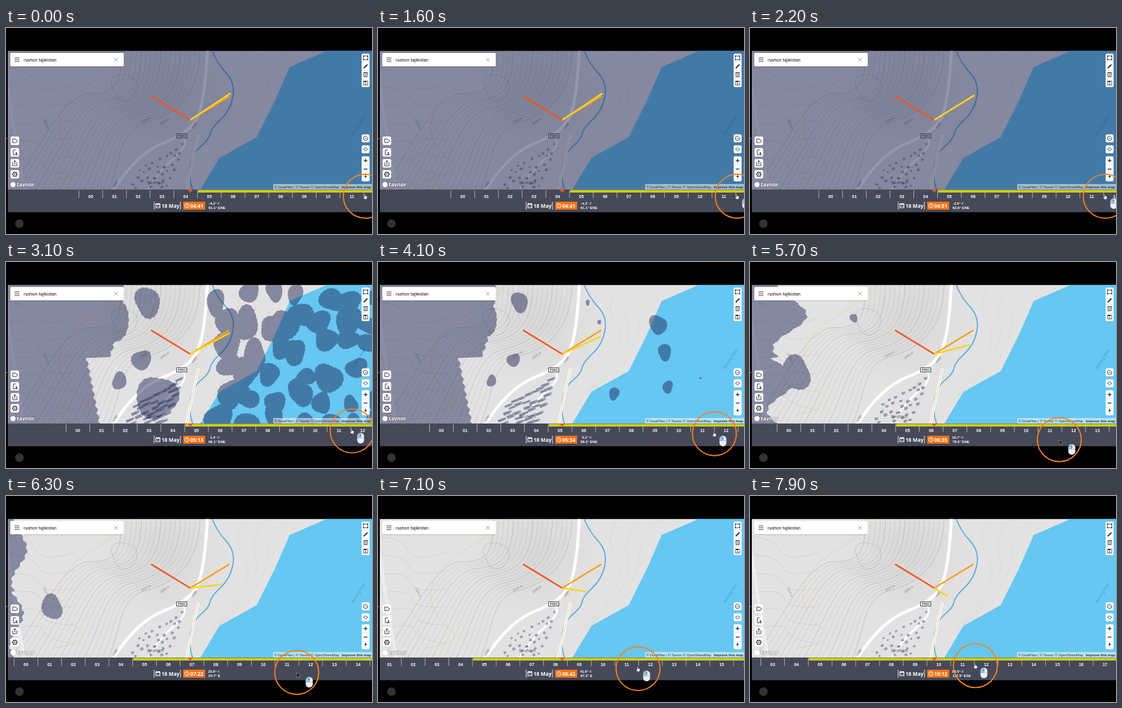
Write an HTML page with a canvas that moves like this. It is 600x338 px and loops after 8 s.

```html
<!DOCTYPE html>
<html lang="en">
<head>
<meta charset="utf-8">
<title>Sun and shade map</title>
<style>
html, body { margin: 0; width: 100%; height: 100%; overflow: hidden; background: #000; }
canvas { display: block; width: 600px; height: 338px; }
</style>
</head>
<body>
<canvas id="stage" width="600" height="338"></canvas>
<script>
const ctx = document.getElementById('stage').getContext('2d');
const LOOP = 8000, STEP = 100, HOUR = 38.9;
const TOP = 37.5, BASE = 266;
const SUNRISE = 2600;
const SANS = '"Open Sans", "Noto Sans", sans-serif';
const ARIAL = '"Liberation Sans", Arial, sans-serif';
const INK = '#333', WHITE = '#fff';
const { sin, cos, exp, sqrt, max, min, floor, round, PI } = Math;
const RAD = PI / 180;
const DIRS = ['N', 'NNE', 'NE', 'ENE', 'E', 'ESE', 'SE', 'SSE', 'S'];

// Clock in minutes over the drag: [ms, minutes]
const CLOCK = [[1500, 281], [2200, 291], [3100, 313], [4100, 334], [5200, 366], [6300, 442], [7900, 612]];

// Lasting shade patches: x, y, radius, time of vanishing
const LASTING = [
  [459, 103, 21, 4900], [470, 148, 17, 4900], [475, 205, 13, 4900], [387, 216, 13, 4900], [232, 66, 21, 4900],
  [222, 161, 15, 4900], [186, 195, 12, 4900], [170, 92, 32, 5800], [75, 182, 42, 6950], [247, 222, 32, 4000]];

// Monotone cubic through the clock keys
function clockAt(t) {
  const k = CLOCK, last = k.length - 1;
  if (t <= k[0][0]) return k[0][1];
  if (t >= k[last][0]) return k[last][1];
  const i = k.findIndex(key => key[0] > t) - 1;
  const slope = n => (k[n + 1][1] - k[n][1]) / (k[n + 1][0] - k[n][0]);
  const tangent = n => {
    if (n === 0) return 0;
    if (n === last) return slope(n - 1);
    const p = slope(n - 1), q = slope(n);
    return 2 * p * q / (p + q);
  };
  const [t0, a] = k[i], [t1, b] = k[i + 1], h = t1 - t0, u = (t - t0) / h, v = 1 - u;
  return v * v * ((1 + 2 * u) * a + u * h * tangent(i)) + u * u * ((3 - 2 * u) * b - v * h * tangent(i + 1));
}

function sunAt(minutes) {
  const lat = 37.98 * RAD, dec = 19.55 * RAD, h = (minutes - 729.7) * .25 * RAD;
  const alt = Math.asin(sin(lat) * sin(dec) + cos(lat) * cos(dec) * cos(h));
  const east = -cos(dec) * sin(h);
  const north = cos(lat) * sin(dec) - sin(lat) * cos(dec) * cos(h);
  return { alt: alt / RAD, az: Math.atan2(east, north) / RAD };
}

function seeded(seed) {
  return () => (seed = (seed * 16807) % 2147483647) / 2147483647;
}

const PATCHES = (() => {
  const rnd = seeded(4242), list = LASTING.map(([x, y, r, end]) => ({ x, y, rx: r, ry: r * 1.15, end }));
  for (let gx = 355; gx < 610; gx += 42) for (let gy = 55; gy < 266; gy += 42)
    list.push({ x: gx + 24 * (rnd() - .5), y: gy + 24 * (rnd() - .5), rx: 12 + 12 * rnd(), ry: 13 + 14 * rnd(), end: 3500 + 650 * rnd() });
  return list;
})();

function rect(x, y, w, h, fill, r = 0) {
  ctx.fillStyle = fill;
  ctx.beginPath();
  ctx.roundRect(x, y, w, h, r);
  ctx.fill();
}

function disc(x, y, r, fill) {
  ctx.fillStyle = fill;
  ctx.beginPath();
  ctx.arc(x, y, r, 0, 2 * PI);
  ctx.fill();
}

function ring(x, y, r, color, width = 1) {
  ctx.strokeStyle = color;
  ctx.lineWidth = width;
  ctx.beginPath();
  ctx.arc(x, y, r, 0, 2 * PI);
  ctx.stroke();
}

function text(str, x, y, font, fill, align = 'left') {
  ctx.font = font;
  ctx.fillStyle = fill;
  ctx.textAlign = align;
  ctx.fillText(str, x, y);
}

function slanted(str, x, y, deg, font, fill) {
  ctx.save();
  ctx.translate(x, y);
  ctx.rotate(deg * RAD);
  text(str, 0, 2, font, fill, 'center');
  ctx.restore();
}

function trace(pts) {
  ctx.beginPath();
  for (let i = 0; i < pts.length; i += 2) ctx.lineTo(pts[i], pts[i + 1]);
}

function line(pts, color, width) {
  trace(pts);
  ctx.strokeStyle = color;
  ctx.lineWidth = width;
  ctx.stroke();
}

function polygon(pts, fill) {
  trace(pts);
  ctx.fillStyle = fill;
  ctx.fill();
}

function curve(pts, color, width, dash = []) {
  const n = pts.length;
  ctx.strokeStyle = color;
  ctx.lineWidth = width;
  ctx.setLineDash(dash);
  ctx.beginPath();
  ctx.moveTo(pts[0], pts[1]);
  for (let i = 2; i < n - 2; i += 2) {
    const end = i === n - 4 ? 1 : .5;
    ctx.quadraticCurveTo(pts[i], pts[i + 1],
      pts[i] + (pts[i + 2] - pts[i]) * end, pts[i + 1] + (pts[i + 3] - pts[i + 1]) * end);
  }
  ctx.stroke();
  ctx.setLineDash([]);
}

// Adds a wobbly closed outline to the current path
function blob(x, y, rx, ry) {
  for (let i = 0; i < 60; i++) {
    const a = i * PI / 30;
    const r = 1 + .1 * sin(2 * a + x) + .08 * sin(3 * a + y) + .025 * sin(19 * a);
    const px = x + rx * r * cos(a), py = y + ry * r * sin(a);
    i ? ctx.lineTo(px, py) : ctx.moveTo(px, py);
  }
  ctx.closePath();
}

function drawContours() {
  ctx.lineWidth = .6;
  for (let i = 0; i < 17; i++) {
    ctx.strokeStyle = `rgba(70,70,66,${i % 4 ? .2 : .36})`;
    ctx.beginPath();
    ctx.moveTo(318 - 8 * i, TOP);
    ctx.bezierCurveTo(316 - 8 * i, 100, 290 - 7 * i, 140 - 2 * i, 226 - 6 * i, 156 - 3 * i);
    ctx.bezierCurveTo(185 - 6 * i, 170 - 3 * i, 190 - 8 * i, 215 - 2 * i, 168 - 10 * i, BASE);
    ctx.stroke();
  }
  for (let i = 0; i < 6; i++)
    curve([3, 66 + 31 * i, 40 + 4 * i, 70 + 27 * i, 60, 110 + 25 * i, 112, 92 + 30 * i], 'rgba(70,70,66,.18)', .6);
  for (let i = 0; i < 3; i++)
    curve([392 + 34 * i, TOP, 372 + 28 * i, 75, 402 + 14 * i, 115, 386 + 7 * i, 166, 340, 214 + 4 * i], 'rgba(70,70,66,.1)', .6);
  ctx.strokeStyle = 'rgba(70,70,66,.3)';
  ctx.beginPath();
  blob(194, 97, 22, 20);
  ctx.stroke();
}

function drawVillage(sun) {
  const rnd = seeded(77);
  const reach = sun.alt > 0 ? min(12, 1.1 / Math.tan(sun.alt * RAD)) : 0;
  const dx = -sin(sun.az * RAD) * reach, dy = cos(sun.az * RAD) * reach;
  for (let row = 0; row < 6; row++) for (let col = 0; col < 8; col++) {
    const x = 289 - row * 5.5 - col * 10 + rnd() * 5;
    const y = 190 + row * 13 + col * 5.5 + rnd() * 5;
    const size = 3.2 + rnd() * 2;
    if (x < 192 || y > 263 || rnd() < .13) continue;
    ctx.save();
    ctx.translate(x, y);
    line([0, 0, dx, dy], '#858aa0', size);
    ctx.rotate(-.5);
    rect(-size / 2, -size / 2, size, size * .85, '#9aa1b2');
    ctx.restore();
  }
}

function drawLand(sun) {
  rect(3, TOP, 597, BASE - TOP, '#e3e2e2');
  const slope = ctx.createRadialGradient(260, 100, 10, 260, 100, 110);
  slope.addColorStop(0, 'rgba(90,90,80,.07)');
  slope.addColorStop(1, 'rgba(90,90,80,0)');
  rect(3, TOP, 597, BASE - TOP, slope);
  drawContours();

  polygon([526, TOP, 465, 64, 441, 119, 411, 179, 350, 213, 318, BASE, 600, BASE, 600, TOP], '#66c7f2');
  const path = [316, 174, 306, 215, 296, BASE];
  curve([3, 95, 14, 180, 30, BASE], '#ededf0', 5);
  curve([212, TOP, 185, 62, 90, 122, 84, 190, 147, 240, 75, 250], '#dbd08c', 1, [4, 1]);
  curve([338, TOP, 346, 58, 376, 90, 368, 135, 336, 165, 333, 183, 306, 205, 299, 245, 306, BASE], '#5fb2dc', 2);
  curve([289, 179, 302, 190, 250, 235, 232, BASE], WHITE, 3);
  curve([330, TOP, 326, 120, 302, 172, 215, 205, 176, BASE], WHITE, 5);
  curve(path, WHITE, 4);
  curve(path, '#dfcf8c', 1.3, [3, 1]);
  drawVillage(sun);

  const tiny = '5px ' + SANS;
  slanted('2100 m', 229, 151, -28, tiny, '#777');
  slanted('2000 m', 260, 153, -34, tiny, '#777');
  slanted('2500 m', 66, 158, 65, tiny, '#888');
  slanted('Bartang River', 578, 159, -57, 'italic 6.5px ' + SANS, '#4a9cc4');
  slanted('P\u042F80', 309, 160, -58, tiny, '#666');
  slanted('P\u042F80', 179, 256, -62, tiny, '#666');
  rect(279, 173, 18, 8, '#444', 1.5);
  rect(280, 174, 16, 6, WHITE, 1);
  text('P\u042F80', 288, 179.3, '600 5.5px ' + SANS, INK, 'center');
  disc(245, 246.5, 1, INK);
  text('Spishoch', 245, 255.5, '6.5px ' + SANS, '#454545', 'center');
}

// East edge of the mountain's shadow, drawing back to the west
function ridge(y, left) {
  const full = y < 157 ? 192 - .0016 * (y - 38) ** 2 : 132 + .2 * (y - 157);
  const lobes = 110 * left * (1 - left) * cos((y - 88) * 2 * PI / 105);
  return full * left + lobes + 1.6 * sin(y * .5) + sin(y * 1.7);
}

function drawShade(t) {
  ctx.fillStyle = 'rgba(26,34,81,.47)';
  ctx.beginPath();
  if (t < SUNRISE) ctx.rect(0, TOP, 600, BASE - TOP);
  else {
    const left = min(1, 1 - (t - 4100) / 2500);
    const swell = 1 + max(0, 3100 - t) / 300;
    if (left > 0) {
      ctx.moveTo(-20, TOP);
      for (let y = TOP; y <= BASE; y += 1.5) ctx.lineTo(ridge(y, left) * sqrt(swell), y);
      ctx.lineTo(-20, BASE);
      ctx.closePath();
    }
    for (const { x, y, rx, ry, end } of PATCHES) {
      if (t >= end) continue;
      const s = sqrt(min(1, (end - t) / (end - 3100))) * swell;
      blob(x, y, rx * s, ry * s);
    }
  }
  ctx.fill();
}

function drawRay(alt, az, color) {
  const r = 72 * (1 - alt / 90), a = az * RAD;
  line([302, 151, 302 + r * sin(a), 151 - 1.2 * r * cos(a)], color, 2.6);
}

function drawRays(sun) {
  drawRay(0, 63, '#f7a11c');
  drawRay(sun.alt, sun.az, '#f8d31d');
  drawRay(0, -63, '#f4541b');
}

function drawLeftButtons() {
  const x = 14.5;
  for (const y of [185, 204, 222, 240]) rect(7.5, y - 7, 14, 14, WHITE, 2.5);
  line([17, 188, 11, 188, 11, 182, 14, 182, 18, 184, 19, 185, 17, 188], INK, 1);
  line([16, 200, 12, 200, 12, 208, 15, 208], INK, 1);
  disc(17, 205.2, 1.2, INK);
  rect(15.2, 207, 3.8, 1.5, INK);
  line([12, 221, 11, 221, 11, 226, 18, 226, 18, 221, 17, 221], INK, 1);
  line([x, 224, x, 217.5], INK, 1);
  line([12.5, 219.5, x, 217.5, 16.5, 219.5], INK, 1);
  ring(x, 240, 3.2, INK, 1.3);
  for (let a = 0; a < 6; a++) disc(x + 4 * cos(a * PI / 3), 240 + 4 * sin(a * PI / 3), .8, INK);
  disc(x, 240, 1.1, INK);
}

function drawRightButtons() {
  const x = 589.5;
  for (const [y, h] of [[42, 55], [174.5, 13], [192.5, 13], [210.5, 41]]) rect(583, y, 13, h, WHITE, 2.5);
  for (const y of [55.5, 69, 83, 224.5, 238]) rect(583, y, 13, .6, '#ccc');
  ctx.strokeStyle = INK;
  ctx.lineWidth = .9;
  ctx.strokeRect(586, 46, 7, 6);
  for (const px of [586, 593]) for (const py of [46, 52]) disc(px, py, 1, INK);
  line([586.5, 66, 592.5, 60], INK, 2.2);
  line([586, 73.2, 593, 73.2], INK, 1);
  ctx.strokeRect(587, 73.5, 5, 6.5);
  line([x, 75, x, 79], INK, .8);
  ctx.strokeRect(586, 87, 7, 6.5);
  rect(587, 87, 4, 2, INK);
  disc(x, 91.5, 1.1, INK);
  ring(x, 181, 3.6, INK);
  rect(591, 177, 3, 3, WHITE);
  line([588.5, 181, x, 182, 592.5, 178.5], INK, .9);
  line([586, 199, x, 196.5, 593, 199, x, 202, 586, 199], INK, .9);
  for (const y of [217.5, 231.5]) line([586.5, y, 592.5, y], INK, 1.4);
  line([x, 214.5, x, 220.5], INK, 1.4);
  polygon([x, 240.5, 591.5, 245, 587.5, 245], INK);
  polygon([x, 250, 591, 246, 588, 246], '#ccc');
}

function drawMapUi() {
  rect(7, 42, 186, 22, 'rgba(0,0,0,.2)', 1.5);
  rect(7, 41, 186, 22, WHITE, 1.5);
  for (const y of [48.5, 51.5, 54.5]) rect(14, y, 8, 1, '#444');
  text('rushon tajikistan', 29, 54.7, '7.3px Roboto, sans-serif', '#111');
  line([177, 49, 183, 55], '#999', .9);
  line([183, 49, 177, 55], '#999', .9);
  drawLeftButtons();
  drawRightButtons();

  disc(11.5, 257, 4.2, WHITE);
  ctx.strokeStyle = 'rgba(60,60,70,.5)';
  ctx.lineWidth = 1.2;
  ctx.font = 'bold 8.7px ' + SANS;
  ctx.textAlign = 'left';
  ctx.strokeText('tavnor', 17.5, 260);
  text('tavnor', 17.5, 260, ctx.font, WHITE);

  rect(438, 256, 162, 9.5, 'rgba(255,255,255,.5)');
  text('© DuskPlan | © Tavnor © OpenStreetMap', 440, 263, '5.75px ' + ARIAL, INK);
  text('Improve this map', 598.5, 263, 'bold 5.8px ' + ARIAL, INK, 'right');
}

const rulerStart = minutes => 119.5 - (minutes - 281) / 1.515;
const pad = v => String(v).padStart(2, '0');

function drawTimeline(minutes, sun) {
  const x0 = rulerStart(minutes);
  rect(3, 265, 597, 37.5, '#464958');
  for (let h = 0; h < 24; h++) {
    const x = x0 + h * HOUR;
    if (x > 3) rect(x - .4, 266, .8, 13, 'rgba(255,255,255,.7)');
    text(pad(h), x + HOUR / 2, 278.5, 'bold 7px ' + ARIAL, WHITE, 'center');
  }
  const rise = x0 + 5.025 * HOUR;
  rect(rise, 265.5, 600 - rise, 4.5, '#c9cc1d');
  polygon([297.5, 265, 306.5, 265, 302, 270.5], '#f4511e');

  const bold = 'bold 8.4px ' + SANS;
  for (const x of [242.5, 285.5]) rect(x, 285, .9, 13, WHITE);
  ctx.strokeStyle = WHITE;
  ctx.lineWidth = .9;
  ctx.strokeRect(245.5, 288.5, 7, 6.5);
  rect(245.5, 288.5, 7, 1.6, WHITE);
  for (const x of [247, 250.3]) {
    rect(x, 287, 1, 2, WHITE);
    for (const y of [291.3, 293.1]) rect(x, y, 1.2, .9, WHITE);
  }
  text('18 May', 255, 294.5, bold, WHITE);
  rect(290.5, 285, 36, 13, '#f97316');
  ring(296.5, 291.5, 3.6, WHITE);
  line([296.5, 289, 296.5, 291.7, 298.3, 292.6], WHITE, .9);
  text(pad(floor(minutes / 60)) + ':' + pad(minutes % 60), 302, 294.6, bold, WHITE);

  const small = 'bold 5.9px ' + ARIAL;
  text(sun.alt.toFixed(1) + '°', 345, 289.5, small, WHITE, 'right');
  line([350, 286, 346.8, 288.2, 350, 289.4], WHITE, .7);
  text(sun.az.toFixed(1) + '° ' + DIRS[round(sun.az / 22.5)], 332, 297.3, small, WHITE);
}

function drawMouse(x, y) {
  rect(x - 6, y - 9, 12, 18, '#8b93a3', 6);
  rect(x - 5.4, y - 8.4, 10.8, 16.8, '#eceef2', 5.4);
  rect(x - 5.4, y - 8.4, 5.2, 8, '#86c3ec', [5, 0, 0, 0]);
  line([x - 5.4, y - .3, x + 5.4, y - .3], '#9aa2b0', .7);
  line([x, y - 8.4, x, y - .3], '#9aa2b0', .7);
  rect(x - .9, y - 6.5, 1.8, 3.8, '#6d7686', .9);
}

// The pointer holds on to the ruler and swings down a little on the way
function drawPointer(t, minutes) {
  const swing = exp(-(((t - 5700) / 1600) ** 2));
  const arrow = t >= 4700 && t < 7000;
  ctx.save();
  ctx.translate(rulerStart(minutes) + 469.5 - 7 * swing, 276 + 15.5 * swing);
  ring(0, 0, 36, '#f5821f', 1.9);
  const shape = arrow
    ? [0, 0, 0, 8.5, 2, 6.8, 3.4, 9.6, 4.8, 9, 3.5, 6.2, 6, 6, 0, 0]
    : [-1.5, -4, -.3, -4, 0, -.7, 3.4, .3, 2.5, 5, -1.2, 5, -4, 1, -1.4, 1.5, -1.5, -4];
  polygon(shape, arrow ? '#111' : WHITE);
  line(shape, arrow ? '#aaa' : '#222', .6);
  if (t >= 800) arrow ? drawMouse(20.5, 16) : drawMouse(14, 12);
  ctx.restore();
}

function draw(t) {
  const exact = clockAt(t), minutes = round(exact), sun = sunAt(minutes);
  rect(0, 0, 600, 338, '#000');
  rect(0, 180.5, 1.5, 2, '#6f7fb0');
  ctx.save();
  ctx.beginPath();
  ctx.rect(3, TOP, 597, 265);
  ctx.clip();
  drawLand(sun);
  drawShade(t);
  drawRays(sun);
  drawMapUi();
  drawTimeline(minutes, sun);
  ctx.restore();
  disc(22, 321, 7, '#333');
  drawPointer(t, exact);
}

let start;
function tick(now) {
  start ??= now;
  const t = (now - start) % LOOP;
  draw(floor(t / STEP) * STEP);
  requestAnimationFrame(tick);
}
requestAnimationFrame(tick);
</script>
</body>
</html>
```
